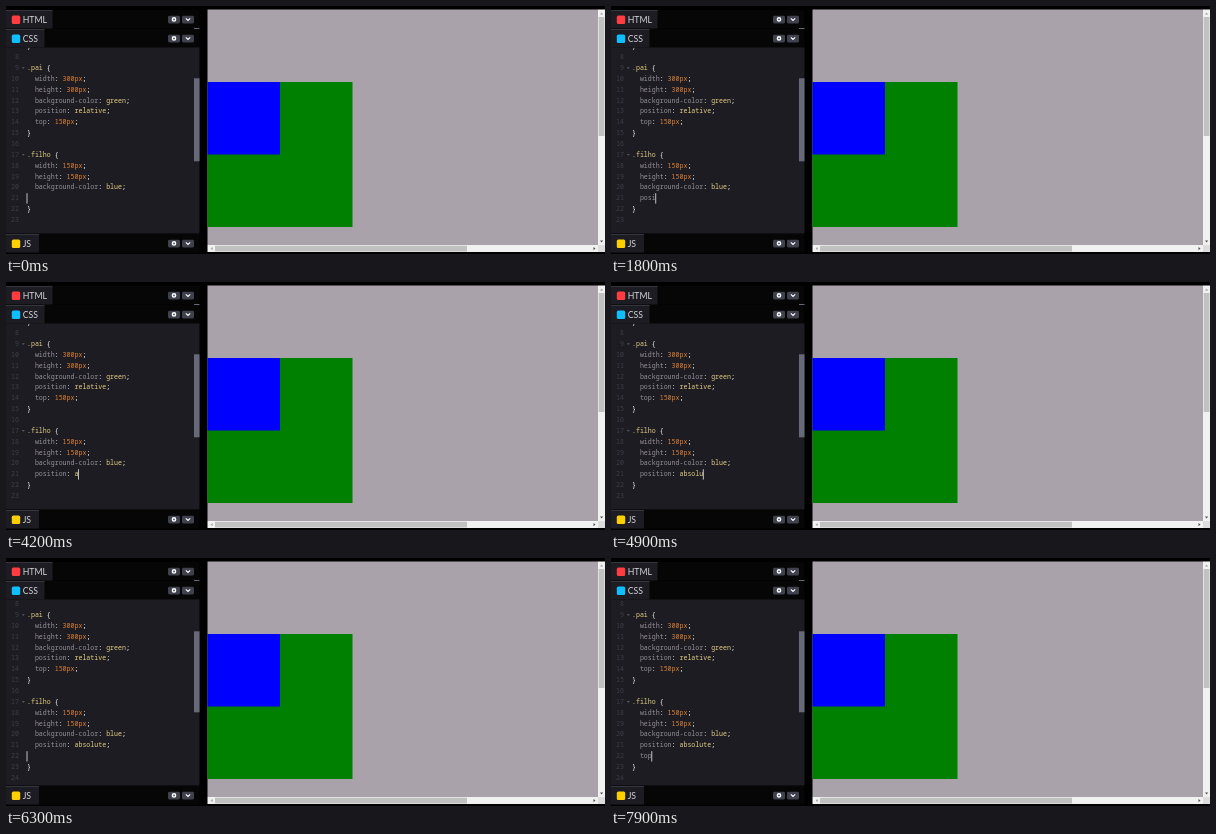
An HTML page for the animation above (8000 ms loop, 599 by 248 pixels).

```html
<!DOCTYPE html>
<html lang="pt">
<head>
<meta charset="utf-8">
<style>
  html, body { margin: 0; width: 100%; height: 100%; overflow: hidden; background: #000; }
  svg { display: block; width: 599px; height: 248px; }
  .code { font: 500 6.6px "Noto Sans Mono", "DejaVu Sans Mono", monospace; }
  .title { font: 8.7px Lato, sans-serif; fill: #d4d5db; }
  .num { fill: #3d3e48; text-anchor: end; }
  .prop { fill: #96919b; }
  .word { fill: #e3d085; }
  .size { fill: #dc8136; }
  .mark { fill: #fff; }
</style>
</head>
<body>
<svg viewBox="0 0 599 248">
  <defs>
    <clipPath id="pane"><rect y="41.5" width="193" height="186"/></clipPath>
  </defs>

  <rect width="599" height="248" fill="#000"/>
  <rect y="41" width="193.5" height="186.5" fill="#1d1c22"/>
  <g clip-path="url(#pane)"><g id="code" class="code"></g></g>
  <rect id="thumb" x="188" width="5.5" fill="#666978"/>
  <g id="bars"></g>
  <rect x="188" y="22" width="5.5" height="1" fill="#666978"/>

  <g id="preview">
    <rect x="201.5" y="3.5" width="390.5" height="235.5" fill="#a9a2aa"/>
    <rect x="201.5" y="76" width="145" height="145" fill="#008000"/>
    <rect x="201.5" y="76" width="72.5" height="72.5" fill="#0000ff"/>
    <path d="M592 3.5h7V246H201.5v-7H592z" fill="#f1f1f1"/>
    <rect x="592" y="239" width="7" height="7" fill="#dcdcdc"/>
    <rect x="592.7" y="11" width="5.8" height="119" fill="#c1c1c1"/>
    <rect x="209" y="239.7" width="252" height="5.8" fill="#c1c1c1"/>
    <path d="M594 8.6l1.6-2 1.6 2z M206.6 241l-2 1.6 2 1.6z" fill="#a3a3a3"/>
    <path d="M594 234.5l1.6 2 1.6-2z M587.5 241l2 1.6-2 1.6z" fill="#505050"/>
  </g>
</svg>

<script>
const LOOP = 8000, PITCH = 10.85, CHAR = 3.96, LEFT = 21, SCROLL = -4.9;
const byId = id => document.getElementById(id);

// Panel headers: title, top edge, tab width, badge colour
const header = ([name, y, width, color]) => `
  <g transform="translate(0 ${y})">
    <rect width="193.5" height="18.5" fill="#060606"/>
    <rect width="${width}" height="18.5" fill="#1d1c22"/>
    <rect width="${width}" height="1" fill="#34363e"/>
    <rect x="5.8" y="5.6" width="8.4" height="8.4" rx="1.6" fill="${color}"/>
    <text class="title" x="16.7" y="13">${name}</text>
    <rect x="162" y="5.8" width="12" height="7.6" rx="1.4" fill="#3f414d"/>
    <rect x="176" y="5.8" width="12" height="7.6" rx="1.4" fill="#3f414d"/>
    <circle cx="168" cy="9.4" r="1.6" fill="none" stroke="#fff" stroke-width="1.5"/>
    <path d="M179.8 8.4l2.2 2.1 2.2-2.1" fill="none" stroke="#fff" stroke-width="1.1"/>
  </g>`;
byId("bars").innerHTML = [
  ["HTML", 4, 46.5, "#ff3c41"],
  ["CSS", 23, 38.5, "#0ebeff"],
  ["JS", 228, 33, "#fcd000"]
].map(header).join("");

const span = (kind, text) => `<tspan class="${kind}">${text}</tspan>`;

function paint(line) {
  if (/^[.}]/.test(line)) {
    return span("word", line.slice(0, -1)) + span("mark", line.slice(-1));
  }
  const [, prop, colon, value, end] = line.match(/^([^:]*)(:?)([^;]*)(;?)$/);
  return span("prop", prop) + span("mark", colon) +
    span(/\d/.test(value) ? "size" : "word", value) + span("mark", end);
}

const FIRST = 7;
const before = [
  "}", "", ".pai {", "  width: 300px;", "  height: 300px;",
  "  background-color: green;", "  position: relative;", "  top: 150px;", "}", "",
  ".filho {", "  width: 150px;", "  height: 150px;", "  background-color: blue;"
];

// Each step: start time, typed text, caret hidden
const steps = [
  [0, ""], [500, "", true], [800, "  "], [1300, "  ", true],
  [1500, "  p"], [1600, "  pos"], [1800, "  posi"], [1900, "  posit"],
  [2000, "  positi"], [2200, "  positio"], [2400, "  position"],
  [2900, "  position", true], [3500, "  position"],
  [3800, "  position:"], [4000, "  position: "], [4200, "  position: a"],
  [4300, "  position: ab"], [4400, "  position: abs"], [4500, "  position: abso"],
  [4700, "  position: absol"], [4900, "  position: absolu"],
  [5200, "  position: absolut"], [5300, "  position: absolute"],
  [5800, "  position: absolute;"],
  [6300, "  position: absolute;\n"], [6600, "  position: absolute;\n  "],
  [7100, "  position: absolute;\n  ", true],
  [7200, "  position: absolute;\n  t"], [7500, "  position: absolute;\n  to"],
  [7800, "  position: absolute;\n  top"]
];

function render([, typed, hidden]) {
  const edited = typed.split("\n");
  const scrolled = edited.length > 1;
  const lines = [...before, ...edited, "}", ""];
  const center = i => 40.3 + i * PITCH;

  let out = lines.map((line, i) => {
    const y = center(i) + 2;
    const text = line.trimStart();
    const x = LEFT + (line.length - text.length) * CHAR;
    const fold = line.endsWith("{")
      ? `<path d="M15.8 ${y - 2.8}h3l-1.5 1.8z" fill="#55585f"/>` : "";
    return `<text class="num" x="13" y="${y}">${FIRST + i}</text>${fold}` +
      `<text x="${x}" y="${y}">${paint(text)}</text>`;
  }).join("");

  if (!hidden) {
    const row = before.length + edited.length - 1;
    const x = LEFT + edited[edited.length - 1].length * CHAR;
    out += `<rect x="${x - 0.4}" y="${center(row) - 5}" width="0.8" height="10.4" fill="#e8e8e8"/>`;
  }
  const code = byId("code");
  code.innerHTML = out;
  code.setAttribute("transform", `translate(0 ${scrolled ? SCROLL : 0})`);
  byId("thumb").setAttribute("y", scrolled ? 73.3 : 72.3);
  byId("thumb").setAttribute("height", scrolled ? 81 : 83);
}

let current;
function tick() {
  const time = performance.now() % LOOP;
  const step = steps.findLast(([start]) => start <= time);
  if (step !== current) render(current = step);
  requestAnimationFrame(tick);
}
tick();
</script>
</body>
</html>
```
